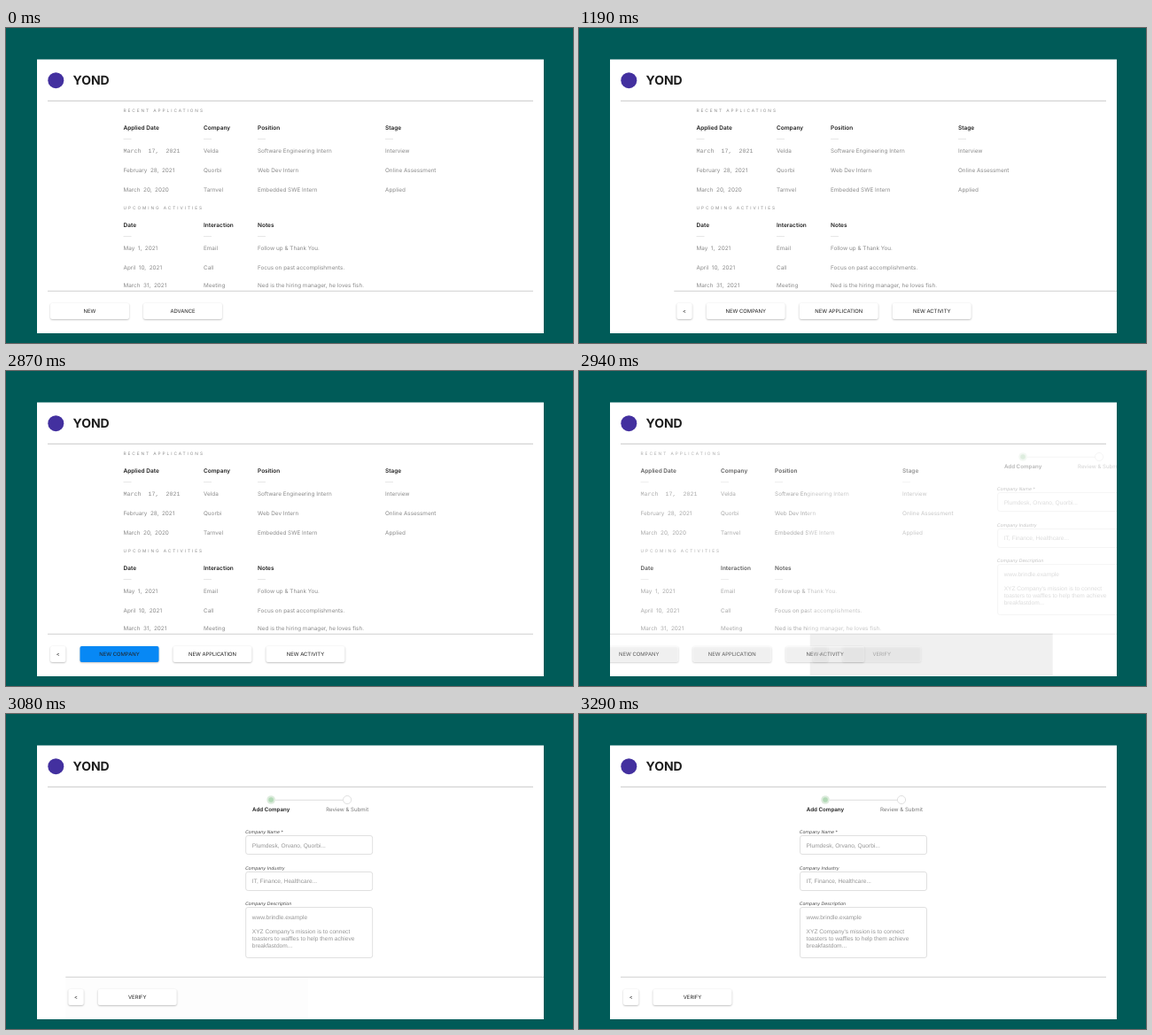
Animation of 640 by 356 pixels, one loop 4.97 s. Source, as an HTML page with a canvas:

```html
<!DOCTYPE html>
<html lang="en">
<head>
<meta charset="utf-8">
<title>Job tracker</title>
<style>
  html, body { margin: 0; width: 100%; height: 100%; overflow: hidden; background: #005b58; }
  canvas { display: block; width: 100%; height: 100%; }
</style>
</head>
<body>
<canvas id="stage" width="640" height="356"></canvas>
<script>
const ctx = document.getElementById('stage').getContext('2d');
const LOOP = 4970;
const CARD = { x: 35, y: 35.5, w: 572, h: 309.5 };
const INTER = 'Inter, sans-serif';
const ARIAL = '"Liberation Sans", Arial, sans-serif';
const BODY = `6.35px ${INTER}`;
const HEAD = `600 6.5px ${INTER}`;
const CAPS = `4.8px ${INTER}`;
const BUTTON = `5.9px ${INTER}`;
const MONO = '6.67px "Liberation Mono", "Courier New", monospace';
const LABEL = 'italic 4.85px "DejaVu Sans", sans-serif';
const FIELD = `6.6px ${ARIAL}`;
const GRAY = '#8a8a8a', INK = '#222';
const COLS = [132.5, 223, 284, 428];

// Stepped slide progress: [start ms, progress]
const MENU_STEPS = [[1190, 0.78], [1260, 0.94], [1330, 1]];
const PAGE_STEPS = [[2940, 0.22], [3010, 0.7], [3080, 0.926], [3220, 0.995], [3290, 1]];

const TABLES = [
  {
    title: 'RECENT APPLICATIONS', y: 95,
    head: ['Applied Date', 'Company', 'Position', 'Stage'],
    rows: [
      [141.2, 'March  17,  2021', 'Velda', 'Software Engineering Intern', 'Interview'],
      [163, 'February  28,  2021', 'Quorbi', 'Web Dev Intern', 'Online Assessment'],
      [185.4, 'March  20,  2020', 'Tarnvel', 'Embedded SWE Intern', 'Applied'],
    ],
  },
  {
    title: 'UPCOMING ACTIVITIES', y: 205,
    head: ['Date', 'Interaction', 'Notes'],
    rows: [
      [251, 'May  1,  2021', 'Email', 'Follow up & Thank You.'],
      [273, 'April  10,  2021', 'Call', 'Focus on past accomplishments.'],
      [293.3, 'March  31,  2021', 'Meeting', 'Ned is the hiring manager, he loves fish.'],
    ],
  },
];

const FIELDS = [
  { label: 'Company Name *', y: 137.5, h: 21, lines: [[151, 'Plumdesk, Orvano, Quorbi...']] },
  { label: 'Company Industry', y: 178.5, h: 21, lines: [[191.4, 'IT, Finance, Healthcare...']] },
  {
    label: 'Company Description', y: 218.5, h: 57,
    lines: [
      [231.6, 'www.brindle.example'],
      [247.8, "XYZ Company's mission is to connect"],
      [255.8, 'toasters to waffles to help them achieve'],
      [263.8, 'breakfastdom...'],
    ],
  },
];

function stepAt(steps, t) {
  let p = 0;
  for (const [start, value] of steps) if (t >= start) p = value;
  return p;
}

function text(str, x, y, font, color, align = 'left', spacing = 0) {
  ctx.font = font;
  ctx.fillStyle = color;
  ctx.textAlign = align;
  ctx.letterSpacing = spacing + 'px';
  ctx.fillText(str, x, y);
}

function rect(x, y, w, h, color) {
  ctx.fillStyle = color;
  ctx.fillRect(x, y, w, h);
}

function disc(x, y, r, fill, stroke) {
  ctx.beginPath();
  ctx.arc(x, y, r, 0, Math.PI * 2);
  ctx.fillStyle = fill;
  ctx.fill();
  if (stroke) {
    ctx.lineWidth = 0.8;
    ctx.strokeStyle = stroke;
    ctx.stroke();
  }
}

function layer(dx, alpha, y, h, draw) {
  if (alpha <= 0) return;
  ctx.save();
  ctx.beginPath();
  ctx.rect(CARD.x, y, CARD.w, h);
  ctx.clip();
  ctx.globalAlpha = Math.min(1, alpha);
  ctx.translate(dx, 0);
  draw();
  ctx.restore();
}

// Old content leaves to the left while new content enters from the right.
function slide(p, width, y, h, drawOld, drawNew) {
  layer(-p * width, 1 - 1.3 * p, y, h, drawOld);
  layer((1 - p) * width, 1.5 * p, y, h, drawNew);
}

function drawList() {
  for (const { title, y, head, rows } of TABLES) {
    text(title, COLS[0], y, CAPS, GRAY, 'left', 1.92);
    head.forEach((str, i) => {
      text(str, COLS[i], y + 20.4, HEAD, INK);
      rect(COLS[i], y + 30, 9, 0.8, '#e2e2e2');
    });
    rows.forEach(([base, ...cells], r) => cells.forEach((str, i) => {
      const mono = y < 100 && r === 0 && i === 0;
      text(str, COLS[i], mono ? base - 0.6 : base, mono ? MONO : BODY, GRAY);
    }));
  }
}

function drawForm() {
  rect(CARD.x, 83, CARD.w, 214, '#fff');
  rect(283, 96.8, 76, 0.8, '#d4d4d4');
  disc(278, 97, 4.8, '#dcebdc');
  disc(278, 97, 2.8, '#b2d9b6');
  disc(364, 97, 4.6, '#fff', '#d8d8d8');
  text('Add Company', 278, 110.2, `600 6.2px ${INTER}`, INK, 'center');
  text('Review & Submit', 364, 110.2, `6.1px ${INTER}`, '#777', 'center');
  for (const { label, y, h, lines } of FIELDS) {
    text(label, 249, y - 2.4, LABEL, '#444');
    ctx.beginPath();
    ctx.roundRect(249.5, y, 143, h, 2.5);
    ctx.lineWidth = 0.8;
    ctx.strokeStyle = '#d9d9d9';
    ctx.stroke();
    for (const [base, str] of lines) text(str, 256.6, base, FIELD, '#959595');
  }
}

function button(label, x, w, fill = '#fff') {
  ctx.save();
  ctx.shadowColor = 'rgba(0,0,0,.28)';
  ctx.shadowBlur = 2;
  ctx.shadowOffsetY = 0.7;
  ctx.beginPath();
  ctx.roundRect(x, 311, w, 18, 2);
  ctx.fillStyle = fill;
  ctx.fill();
  ctx.restore();
  text(label, x + w / 2, 322.2, BUTTON, INK, 'center');
}

function footer(labels, back, hover) {
  rect(47, 296.8, 548, 0.9, '#cacaca');
  if (back) button('<', 50, 17.5);
  labels.forEach((label, i) => {
    button(label, (back ? 83.5 : 50) + i * 105, 89, hover && i === 0 ? '#0788f5' : '#fff');
  });
}

const mainMenu = () => footer(['NEW', 'ADVANCE'], false);
const newMenu = hover => footer(['NEW COMPANY', 'NEW APPLICATION', 'NEW ACTIVITY'], true, hover);
const formMenu = () => footer(['VERIFY'], true);

function render(t) {
  const menu = stepAt(MENU_STEPS, t);
  const page = stepAt(PAGE_STEPS, t);
  const hover = t >= 2870 && t < 2940;

  rect(0, 0, 640, 356, '#005b58');
  rect(CARD.x, CARD.y, CARD.w, CARD.h, '#fff');
  disc(56.3, 59.2, 9, '#43309f');
  text('YOND', 75.5, 64.3, `700 14px ${INTER}`, '#1c1c1c');
  rect(47, 81.9, 548, 0.9, '#c6c6c6');

  slide(page, 286, 83, 214, drawList, drawForm);

  if (page === 0) {
    slide(menu, 274, 296, 48, mainMenu, () => newMenu(hover));
    return;
  }
  // The two footers darken slightly where they overlap.
  const shade = 2 * (page * (1 - page)) ** 2;
  rect(47 + (1 - page) * 274, 298, Math.max(0, 548 - 274), 46, `rgba(0,0,0,${shade})`);
  slide(page, 274, 296, 48, () => newMenu(false), formMenu);
}

ctx.textRendering = 'geometricPrecision';

function tick() {
  render(performance.now() % LOOP);
  requestAnimationFrame(tick);
}
tick();
</script>
</body>
</html>
```
